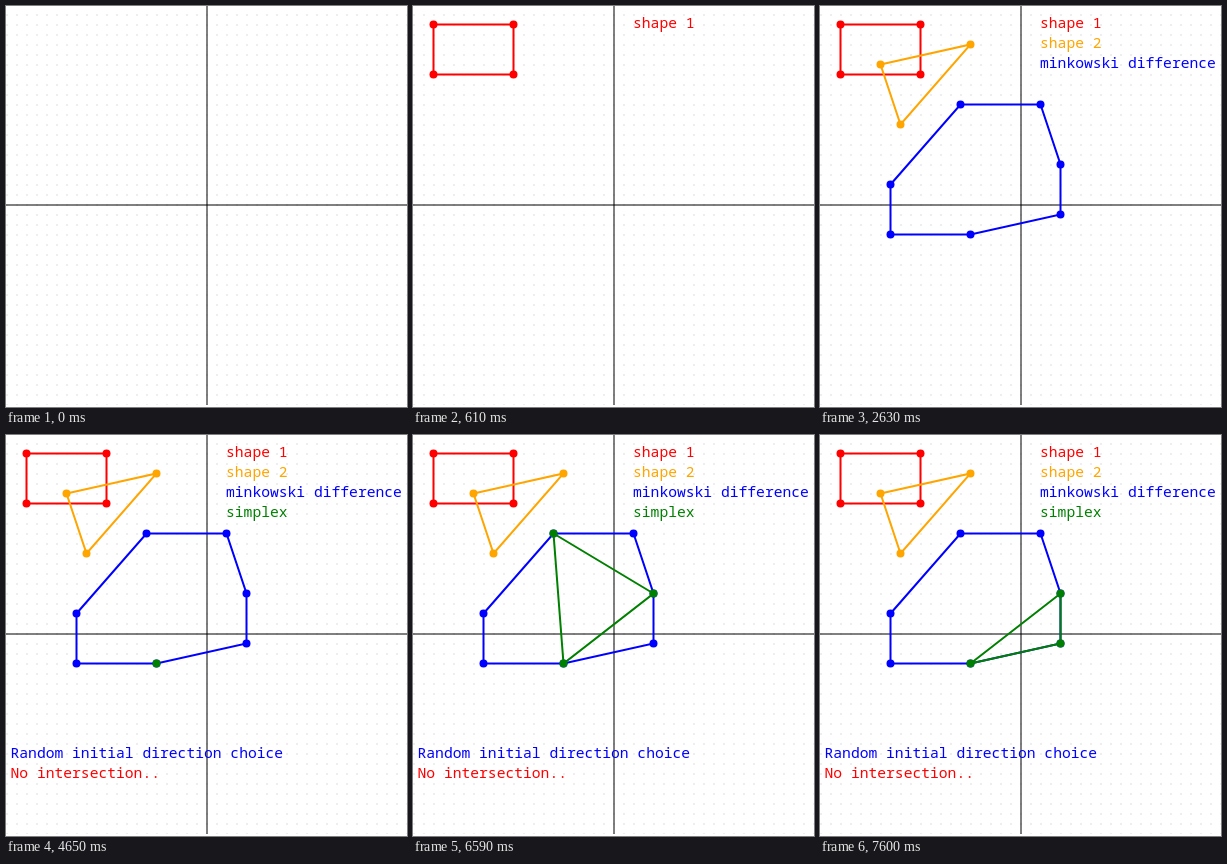
Write an HTML page that moves like this. It is 401 by 401 pixels and loops after 8000 ms.

```html
<!DOCTYPE html>
<html lang="en">
<head>
<meta charset="utf-8">
<title>GJK simplex search</title>
<style>
  html, body { margin: 0; width: 100%; height: 100%; overflow: hidden; background: #fff; }
  svg { display: block; width: 401px; height: 401px; }
  text { font: 14.66px "Noto Sans Mono", "DejaVu Sans Mono", monospace; }
</style>
</head>
<body>
<svg id="stage" viewBox="0 0 401 401">
  <defs>
    <pattern id="dots" width="10" height="10" y="-2" patternUnits="userSpaceOnUse">
      <rect width="2" height="2" fill="#eee"/>
    </pattern>
  </defs>
  <rect width="401" height="399" fill="url(#dots)"/>
  <path d="M201 0V399M0 199H401" stroke="#000"/>
</svg>
<script>
(() => {
  const LOOP = 8000;
  const NS = "http://www.w3.org/2000/svg";
  const stage = document.getElementById("stage");
  const steps = [];

  function add(parent, tag, attrs = {}) {
    const el = document.createElementNS(NS, tag);
    for (const key in attrs) el.setAttribute(key, attrs[key]);
    return parent.appendChild(el);
  }

  // A group that is visible from one time to another
  function step(from, to = LOOP) {
    const el = add(stage, "g");
    steps.push({ el, from, to });
    return el;
  }

  function label(group, x, y, color, text) {
    add(group, "text", { x, y, fill: color }).textContent = text;
  }

  function polygon(group, color, points) {
    const g = add(group, "g", { transform: "translate(.5 .5)" });
    add(g, "polygon", { points: points.join(" "), fill: "none", stroke: color, "stroke-width": 2 });
    for (const [cx, cy] of points) add(g, "circle", { cx, cy, r: 4, fill: color });
  }

  const first = step(610);
  polygon(first, "red", [[20, 18], [100, 18], [100, 68], [20, 68]]);
  label(first, 220, 22, "red", "shape 1");

  const second = step(1620);
  polygon(second, "orange", [[60, 58], [150, 38], [80, 118]]);
  label(second, 220, 42, "orange", "shape 2");

  const lowPt = [150, 228], topPt = [140, 98], rightPt = [240, 158], cornerPt = [240, 208];

  const difference = step(2630);
  polygon(difference, "blue", [lowPt, [70, 228], [70, 178], topPt, [220, 98], rightPt, cornerPt]);
  label(difference, 220, 62, "blue", "minkowski difference");

  const search = step(4650);
  label(search, 220, 82, "green", "simplex");
  label(search, 4.5, 323, "blue", "Random initial direction choice");
  label(search, 4.5, 343, "red", "No intersection..");

  polygon(step(4650, 5580), "green", [lowPt]);
  polygon(step(5580, 6590), "green", [lowPt, topPt]);
  polygon(step(6590, 7600), "green", [lowPt, topPt, rightPt]);
  polygon(step(7600), "green", [lowPt, rightPt, cornerPt]);

  const start = performance.now();
  function draw(now) {
    const t = Math.max(0, now - start) % LOOP;
    for (const { el, from, to } of steps)
      el.style.display = t >= from && t < to ? "" : "none";
    requestAnimationFrame(draw);
  }
  draw(start);
})();
</script>
</body>
</html>
```
